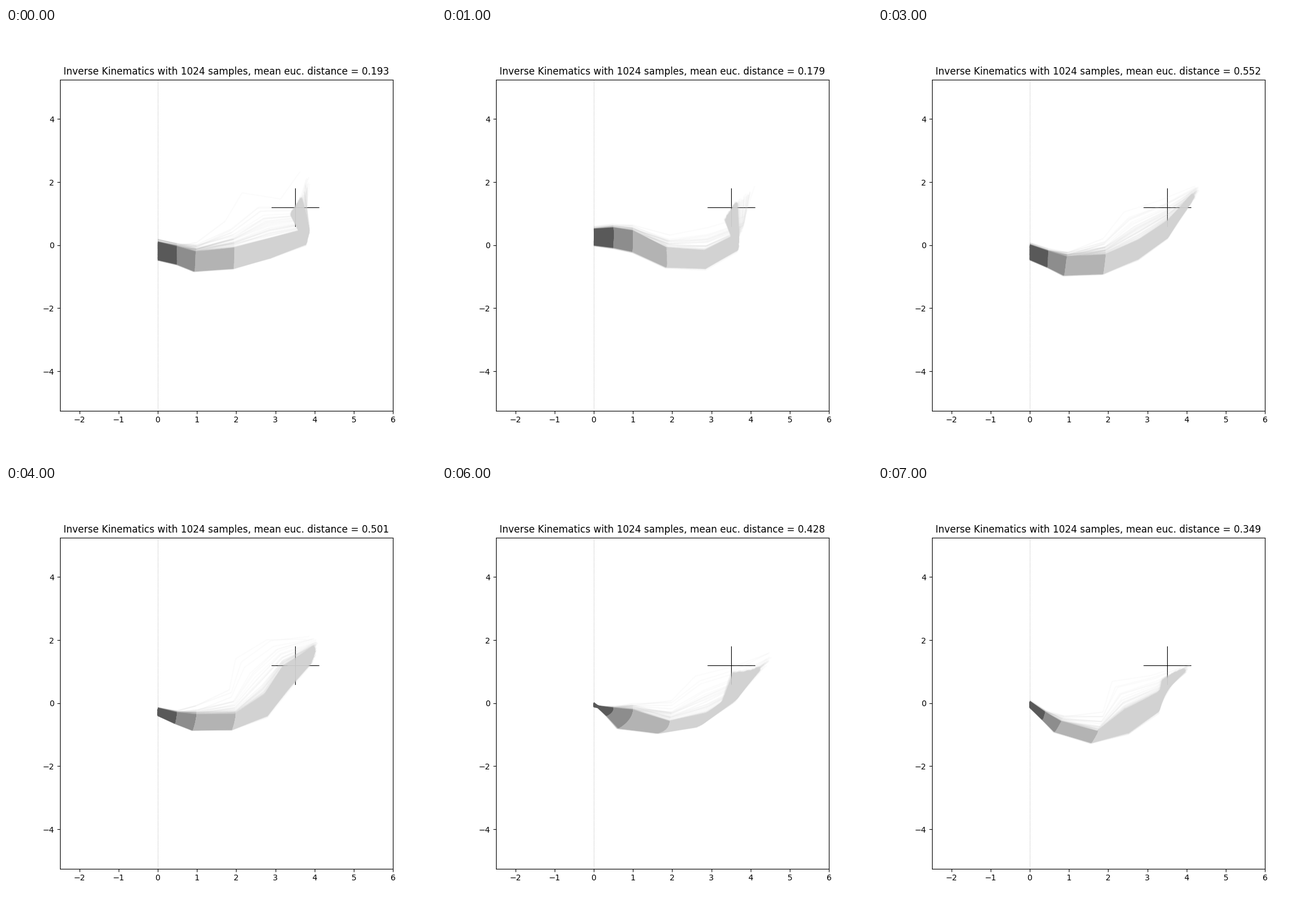
Animation, 748 px wide and 748 px high, one loop 8000 ms. Source, as a matplotlib script:

```python
import numpy as np
import matplotlib.pyplot as plt
from matplotlib.animation import FuncAnimation
from matplotlib.collections import LineCollection

SAMPLES = 1024
LENGTHS = np.array([0.5, 0.5, 1, 1, 1, 1])
TARGET = (3.51, 1.2)
CROSS = 0.6
SHADES = [89, 141, 179, 210, 210, 210]
BOW = np.array([0.15, 0.5, 0.6, 0.8, -0.5, -0.7])

# Each step: mean distance, then lower and upper arm as rail height + joint angles
STEPS = [
    (0.193, [-0.46, -16, -26, 5, 20, 26, 111], [0.09, -17, -18, 7, 17, 17.5, 101]),
    (0.179, [0.0, -9, -14, -29.3, -2, 36, 107], [0.5, 5, -10.5, -32.6, -5.5, 32, 92]),
    (0.604, [-0.37, -12, -40, 4, 32, 32, 70], [0.09, -25, -22, 6, 24, 24, 63]),
    (0.552, [-0.45, -28, -32, 3, 28, 42, 64], [0.0, -24, -20, 4, 28, 40, 52]),
    (0.501, [-0.38, -30, -26, 1.5, 26, 58, 56], [-0.17, -17, -6, 0, 40, 62, 38]),
    (0.507, [0.09, -50, -58, 1, 6, 52, 62], [-0.22, 25, 24, -25, -14, 43, 66]),
    (0.428, [0.0, -50, -54, -8, 12, 46, 74], [-0.1, -8, -6, -22, 15, 38, 56]),
    (0.349, [-0.12, -50, -52, -20, 18, 42, 83], [0.04, -42, -36, -19, 45, 32, 47]),
]


def sample_arms(step):
    """Joint positions of all sampled arms, shape (samples, joints, 2)."""
    rng = np.random.default_rng(40 + step)
    _, low, high = STEPS[step]
    mix = rng.uniform(0, 1, SAMPLES) + rng.normal(0, 0.025, SAMPLES)
    stray = rng.random(SAMPLES) < 0.04
    mix[stray] = rng.normal(0.95, 0.1, stray.sum())
    pose = np.array(low) + mix[:, None] * (np.array(high) - np.array(low))
    pose[:, 0] += rng.normal(0, 0.012, SAMPLES)
    pose[:, 1:] += rng.normal(0, 1.0, (SAMPLES, 6))
    bend = stray * rng.exponential(13, SAMPLES)
    angles = np.radians(pose[:, 1:] + bend[:, None] * BOW)
    joints = np.zeros((SAMPLES, 7, 2))
    joints[:, 1:, 0] = np.cumsum(LENGTHS * np.cos(angles), axis=1)
    joints[:, 1:, 1] = np.cumsum(LENGTHS * np.sin(angles), axis=1)
    joints[:, :, 1] += pose[:, :1]
    return joints


fig, ax = plt.subplots(figsize=(7.48, 7.48), dpi=100)
ax.set_xlim(-2.5, 6)
ax.set_ylim(-5.25, 5.25)
ax.axvline(0, ls=":", c="gray", lw=0.5)
tx, ty = TARGET
ax.plot([tx - CROSS, tx + CROSS], [ty, ty], c="black", lw=0.8)
ax.plot([tx, tx], [ty - CROSS, ty + CROSS], c="black", lw=0.8)
title = ax.set_title("")

# Darker links near the rail lie on top
links = []
for i, shade in enumerate(SHADES):
    link = LineCollection([], colors=str(shade / 255), linewidths=1.5,
                          alpha=0.07, zorder=10 - i)
    ax.add_collection(link, autolim=False)
    links.append(link)


def update(step):
    joints = sample_arms(step)
    for i, link in enumerate(links):
        link.set_segments(joints[:, i:i + 2])
    title.set_text(f"Inverse Kinematics with {SAMPLES} samples, "
                   f"mean euc. distance = {STEPS[step][0]:.3f}")
    return links + [title]


anim = FuncAnimation(fig, update, frames=len(STEPS), interval=1000, repeat=True)
plt.show()
```
